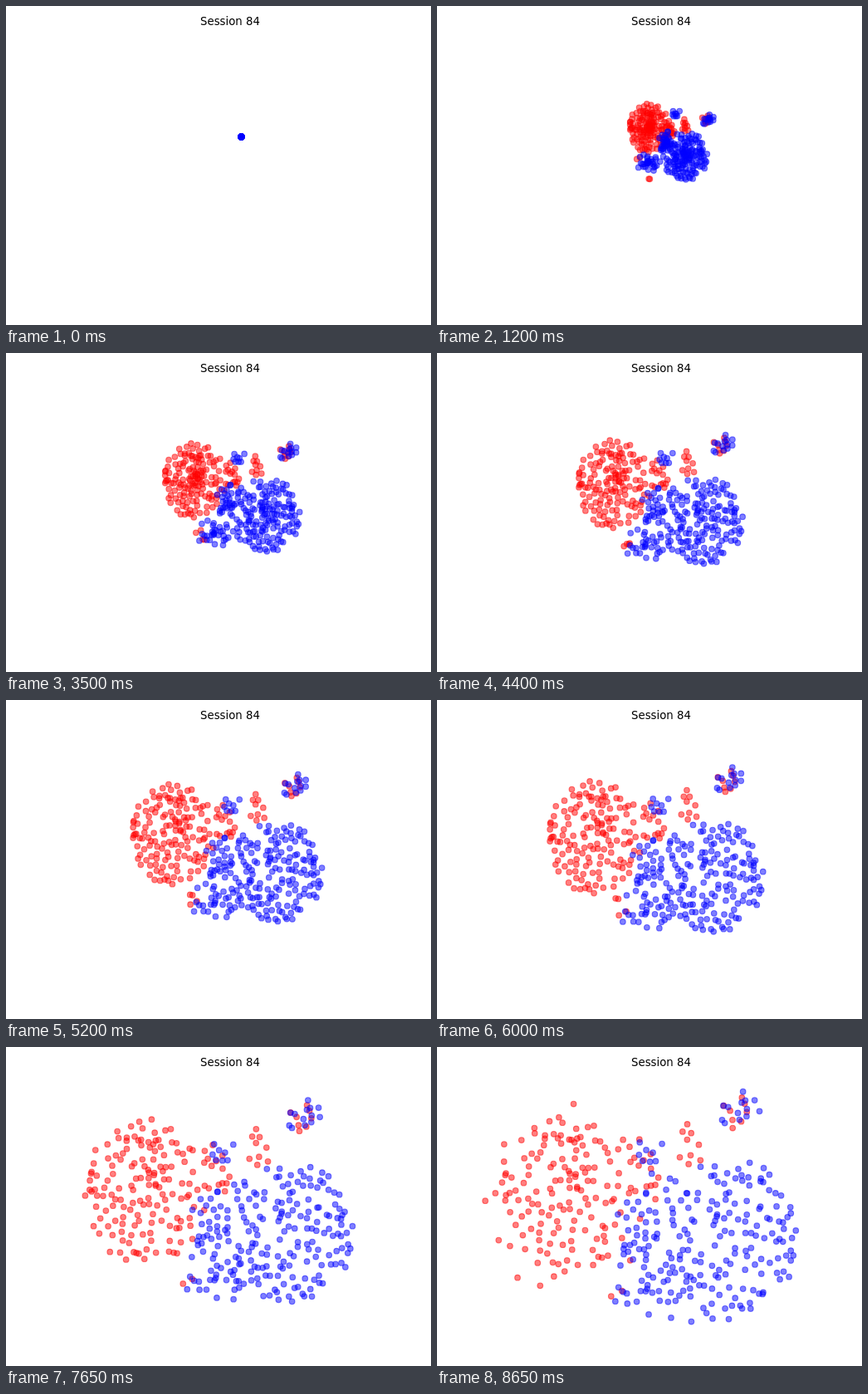
An HTML page with a canvas for the animation above (8.7 s loop, 512 by 384 pixels).

```html
<!DOCTYPE html>
<html lang="en">
<head>
<meta charset="utf-8">
<title>Session 84</title>
<style>
  html, body { margin: 0; width: 100%; height: 100%; overflow: hidden; background: #fff; }
  canvas, svg { position: absolute; left: 0; top: 0; width: 512px; height: 384px; }
  text { font: 13.333px "DejaVu Sans", sans-serif; text-anchor: middle; }
</style>
</head>
<body>
<canvas width="512" height="384"></canvas>
<svg viewBox="0 0 512 384"><text x="270" y="23">Session 84</text></svg>
<script>
const LOOP = 8700, STEP = 50, LAST = LOOP - STEP;
const BURST_END = 2200;   // the quick burst gives way to steady drifting
const SCATTER_START = 7200;
const ORIGIN = [283, 157];
const RED = '#f00', BLUE = '#00f';

const ctx = document.querySelector('canvas').getContext('2d');
const lerp = (a, b, k) => a + (b - a) * k;
const mix = (a, b, k) => a.map((v, i) => lerp(v, b[i], k));
const ramp = (t, from, to) => Math.min(1, Math.max(0, (t - from) / (to - from)));

function seeded(seed) {
  return () => {
    seed = seed + 0x6D2B79F5 | 0;
    let h = Math.imul(seed ^ seed >>> 15, 1 | seed);
    h = h + Math.imul(h ^ h >>> 7, 61 | h) ^ h;
    return ((h ^ h >>> 14) >>> 0) / 4294967296;
  };
}
const random = seeded(84);

function discPoint() {
  const r = Math.sqrt(random()), a = random() * 2 * Math.PI;
  return { x: r * Math.cos(a), y: r * Math.sin(a), r };
}

// Unit disc with loosely spaced dots: of two candidates the lonelier one stays.
function disc(count) {
  const dots = [];
  const gap = p => Math.min(...dots.map(o => Math.hypot(o.x - p.x, o.y - p.y)));
  while (dots.length < count) {
    const a = discPoint(), b = discPoint();
    const dot = gap(a) > gap(b) ? a : b;
    dot.stray = .4 * dot.r * random() ** 5;
    dots.push(dot);
  }
  return dots;
}

// Centre after the burst, centre at the end, and radii at the end.
const cluster = (color, count, from, to, radii) => ({ color, dots: disc(count), from, to, radii });

const clusters = [
  cluster(RED, 145, [251, 145], [154, 176], [78, 93]),
  cluster(RED, 15, [280, 146], [249, 146], [22, 34]),
  cluster(RED, 9, [300, 143], [303, 120], [20, 28]),
  cluster(RED, 2, [252, 214], [197, 252], [4, 2]),
  cluster(RED, 2, [236, 186], [213, 296], [12, 4]),
  cluster(RED, 8, [331, 133], [366, 76], [24, 24]),
  cluster(BLUE, 160, [300, 183], [347, 228], [86, 94]),
  cluster(BLUE, 26, [273, 163], [240, 214], [28, 42]),
  cluster(BLUE, 30, [249, 192], [250, 286], [54, 34]),
  cluster(BLUE, 8, [288, 126], [257, 127], [18, 18]),
  cluster(BLUE, 13, [331, 133], [360, 72], [24, 24])
];

function drawDot(x, y) {
  ctx.beginPath();
  ctx.arc(x, y, 3.33, 0, 2 * Math.PI);
  ctx.fill();
  ctx.stroke();
}

function draw(t) {
  const burst = t < 100 ? 0 : t < BURST_END ? 1 - Math.exp((50 - t) / 530) : 1;
  const drift = ramp(t, BURST_END, LAST);
  const size = burst * lerp(.36, 1, drift);
  const crowding = .5 * (1 - ramp(t, BURST_END, 5200));
  const scatter = ramp(t, SCATTER_START, LAST);

  ctx.clearRect(0, 0, 512, 384);
  for (const { color, dots, from, to, radii } of clusters) {
    const [cx, cy] = mix(ORIGIN, mix(from, to, drift ** .85), burst);
    ctx.fillStyle = ctx.strokeStyle = color;
    for (const { x, y, r, stray } of dots) {
      const reach = size * r ** crowding * (1 + stray * scatter);
      drawDot(cx + x * radii[0] * reach, cy + y * radii[1] * reach);
    }
  }
}

// Plot area
ctx.beginPath();
ctx.rect(43, 29, 454, 326);
ctx.clip();
ctx.translate(.5, .5);
ctx.globalAlpha = .5;
ctx.lineWidth = 1.11;

const start = performance.now();
function tick() {
  const t = (performance.now() - start) % LOOP;
  draw(Math.floor(t / STEP) * STEP);
  requestAnimationFrame(tick);
}
tick();
</script>
</body>
</html>
```
